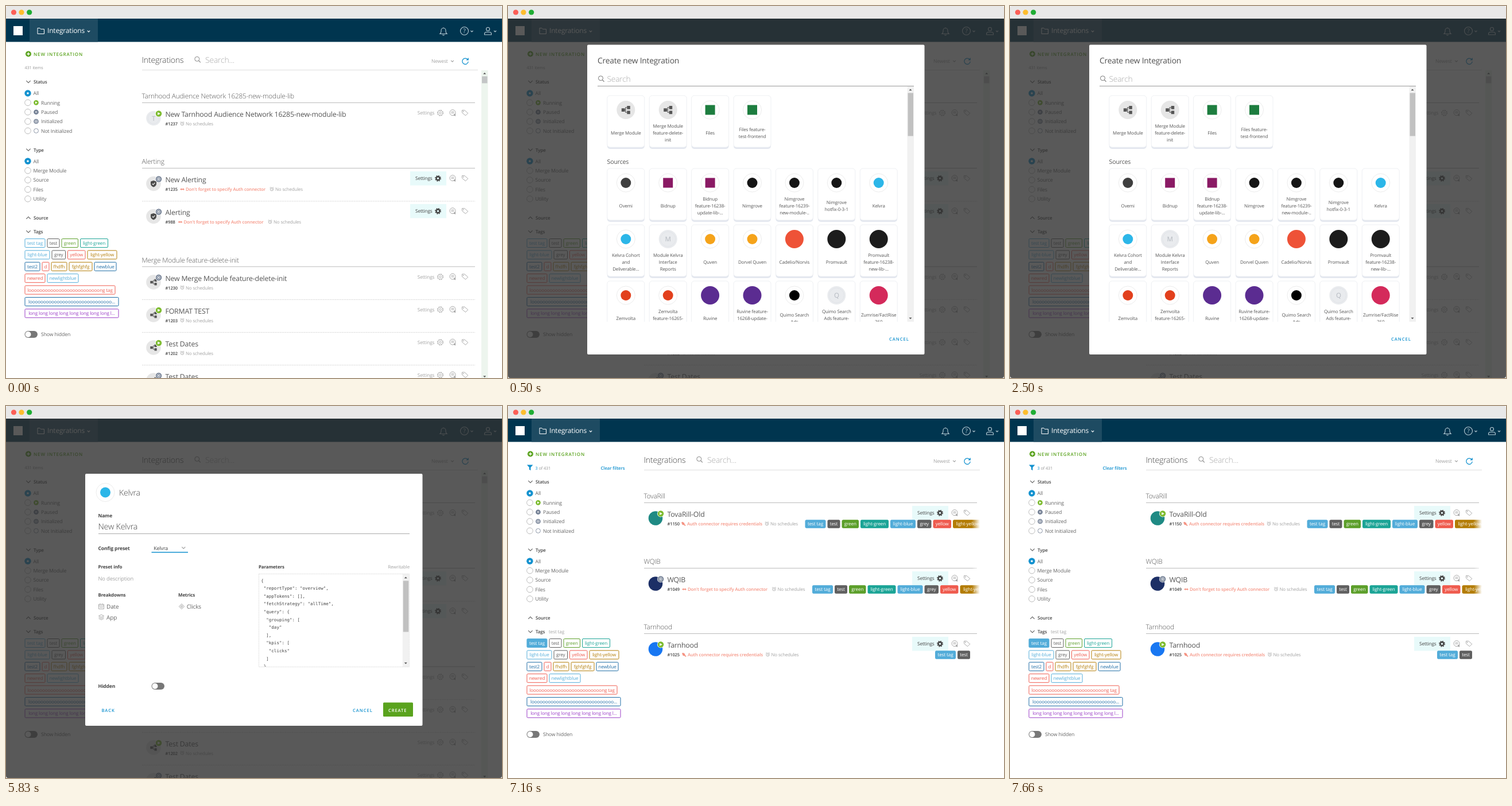
An HTML page for the animation above (8000 ms loop, 864 px wide and 648 px high).

```html
<!DOCTYPE html>
<html lang="en">
<head>
<meta charset="utf-8">
<title>Integrations</title>
<style>
html, body { margin: 0; width: 100%; height: 100%; overflow: hidden; background: #fff; }
svg { display: block; width: 864px; height: 648px; }
text { font-family: "Open Sans", "Noto Sans", sans-serif; letter-spacing: -.015em; white-space: pre; text-rendering: geometricPrecision; }
.mono { font-family: "DejaVu Sans Mono", "Liberation Mono", monospace; letter-spacing: 0; }
</style>
</head>
<body>
<svg id="stage" viewBox="0 0 864 648" xmlns="http://www.w3.org/2000/svg"></svg>
<script>
const LOOP = 8000;
const BLUE = '#1492cf', GREEN = '#5aa31e', LIME = '#7cbb2e', CORAL = '#f59484', SLATE = '#6f7c91', GREY = '#a3a3a3';

// Drawing helpers
const text = (x, y, s, size, fill = '#555', weight = 400, extra = '') =>
  `<text x="${x}" y="${y}" font-size="${size}" fill="${fill}" font-weight="${weight}" ${extra}>${s}</text>`;
const rect = (x, y, w, h, fill, extra = '') =>
  `<rect x="${x}" y="${y}" width="${w}" height="${h}" fill="${fill}" ${extra}/>`;
const circle = (x, y, r, fill, extra = '') =>
  `<circle cx="${x}" cy="${y}" r="${r}" fill="${fill}" ${extra}/>`;
const ring = (x, y, r, stroke, w = 1, extra = '') =>
  circle(x, y, r, 'none', `stroke="${stroke}" stroke-width="${w}" ${extra}`);
const line = (d, stroke, w = 1, extra = '') =>
  `<path d="${d}" fill="none" stroke="${stroke}" stroke-width="${w}" ${extra}/>`;
const shape = (d, fill) => `<path d="${d}" fill="${fill}"/>`;
const at = (x, y, body) => `<g transform="translate(${x} ${y})">${body}</g>`;
const caps = (x, y, s, size, fill, gap = 1) => text(x, y, s, size, fill, 600, `style="letter-spacing:${gap}px"`);
const chevron = (x, y, r, color, up = false) => {
  const h = up ? -r / 2 : r / 2;
  return line(`M${x - r} ${y - h}L${x} ${y + h}L${x + r} ${y - h}`, color, 1.1);
};

// Icons
const lens = (x, y, r, color) => ring(x, y, r, color) + line(`M${x + r * .7} ${y + r * .7}l3.2 3.2`, color, 1.2);
const toggle = (x, y) => rect(x, y - 6, 22.5, 12, '#777', 'rx="6"') + circle(x + 6, y, 5, '#fff');
const gear = (x, y, hot) => hot
  ? ring(x, y, 3, '#444', 2.4) + ring(x, y, 4.7, '#444', 1.4, 'stroke-dasharray="2 1.69"')
  : ring(x, y, 4.3, GREY, .8) + ring(x, y, 5, GREY, 1, 'stroke-dasharray="2 1.93"') + ring(x, y, 1.8, GREY, .8);
const chat = (x, y) => ring(x, y - .3, 5, GREY, .9) +
  line('M-2.6 -1.8h5.2M-2.6 .4h5.2', GREY, .9, `transform="translate(${x} ${y})"`) + shape(`M${x + 1} ${y + 4}l4 2v-5z`, GREY);
const label = (x, y) => at(x, y, line('M-5 -4.5h4.2l6 5.2-4.2 4.2-6-5z', GREY, .9, 'stroke-linejoin="round"') + circle(-2.6, -2.2, .9, GREY));
const clock = (x, y) => ring(x, y, 2.7, GREY, .8) + line(`M${x} ${y - 1.6}v1.8h1.4M${x - 3.4} ${y - 2.5}l1.6-1.4M${x + 3.4} ${y - 2.5}l-1.6-1.4`, GREY, .7);
const play = (x, y, r) => circle(x, y, r, LIME) + shape(`M${x - r * .35} ${y - r * .5}v${r}l${r * .9}-${r * .5}z`, '#fff');
const ready = (x, y, r) => circle(x, y, r, SLATE) + ring(x, y, r * .58, '#fff', .8) + circle(x, y, r * .25, '#fff');
const paused = (x, y, r) => circle(x, y, r, SLATE) + line(`M${x - 1} ${y - 1.8}v3.6M${x + 1} ${y - 1.8}v3.6`, '#fff', .9);
const merge = (x, y, k = 1) => `<g transform="translate(${x} ${y}) scale(${k})">` +
  rect(-6, -2.2, 4.6, 4.6, '#555') + rect(1.6, -5.6, 4.4, 4.6, '#555') + rect(1.6, 1.2, 4.4, 4.6, '#555') +
  line('M-2 0h2M2 -3.4h-2.4v6.8h2.4', '#555', .9) + '</g>';
const shield = (x, y) => at(x, y, shape('M0-5.6L5-3.7V0Q5 4 0 6Q-5 4-5 0V-3.7z', '#4c4c4c') + line('M-2.3 0L-.6 1.8L2.5-1.6', '#fff', 1.1));
const letter = (x, y, s, r) => circle(x, y, r, '#e9ebee') + ring(x, y, r - 3, '#dcdfe4', .6) +
  text(x, y + 4, s, 11.5, '#b4b9c0', 400, 'text-anchor="middle"');
const plug = (x, y) => shape(`M${x} ${y}l3-2v1.3h2v-1.3l3 2-3 2v-1.3h-2v1.3z`, CORAL);
const wrench = (x, y) => shape(`M${x} ${y - 2.5}l2-1 3.2 2 .3 2 2.2 2.2-1 1-2.5-1.6-2.4-.4z`, CORAL);

// Tags: width, name, colour
const SKY = '#52acd9', RED = '#ef5b4e', OCHRE = '#b37c05', NAVY = '#1f6da6';
const TAGS = [
  [[35, 'test tag', SKY], [21, 'test', '#606060'], [28.5, 'green', '#5c9f2a'], [48, 'light-green', '#1ba496']],
  [[43, 'light-blue', SKY], [23.5, 'grey', '#606060'], [30.5, 'yellow', RED], [51, 'light-yellow', OCHRE]],
  [[26, 'test2', NAVY], [12, 'd', RED], [27, 'fhdfh', OCHRE], [40, 'fghfghfg', OCHRE], [38, 'newblue', NAVY]],
  [[35, 'newred', RED], [54, 'newlightblue', SKY]],
  [[157, 'l' + 'o'.repeat(26) + 'ng tag', RED]],
  [[163, 'l' + 'o'.repeat(30) + '...', NAVY]],
  [[163, 'long '.repeat(8) + 'l...', '#9a3cc6']]
];

function tagBox(x, y, [w, name, color], solid, h = 15) {
  return rect(x, y - h / 2, w, h, solid ? color : '#fff', `rx="1.5" stroke="${color}"`) +
    text(x + w / 2, y + 2.9, name, 8.1, solid ? '#fff' : color, 400, 'text-anchor="middle"');
}

function tagRow(x, y, tags, solid, h) {
  return tags.map(tag => {
    const box = tagBox(x, y, tag, solid(tag), h);
    x += tag[0] + 4;
    return box;
  }).join('');
}

function radio(x, y, on) {
  return on ? circle(x, y, 5.7, BLUE) + circle(x, y, 1.7, '#fff') : ring(x, y, 5.3, '#b5b5b5', .9);
}

function sidebar(filtered) {
  const head = (y, s, up) => chevron(39, y, 3.6, '#555', up) + text(48, y + 3, s, 8, '#444', 600);
  const icons = [null, play, paused, ready, (x, y, r) => ring(x, y, r - .4, SLATE, .8)];
  let out = circle(39, 83.5, 5, GREEN) + line('M36.3 83.5h5.4M39 80.8v5.4', '#fff', 1.4) +
    caps(48, 87, 'NEW INTEGRATION', 8, GREEN, .85);
  out += filtered
    ? shape('M33 102.5h10.5l-4 4.6v5.2l-2.5-1.6v-3.6z', BLUE) + text(47.5, 111, `<tspan fill="${BLUE}">3</tspan> of 431`, 7.4, '#999') +
      text(161.5, 111, 'Clear filters', 7.8, BLUE, 600) + text(71, 396, 'test tag', 8.1, GREY)
    : text(32.5, 110, '431 items', 7.25, '#999');
  out += head(132, 'Status');
  ['All', 'Running', 'Paused', 'Initialized', 'Not Initialized'].forEach((s, i) => {
    const y = 152 + 16.35 * i;
    out += radio(38, y, !i) + (i ? icons[i](52.5, y, 4.3) : '') + text(i ? 61 : 47.5, y + 3.2, s, 8.75, '#666');
  });
  out += head(250.5, 'Type');
  ['All', 'Merge Module', 'Source', 'Files', 'Utility'].forEach((s, i) => {
    const y = 270.3 + 16.4 * i;
    out += radio(38, y, !i) + text(47.5, y + 3.2, s, 8.75, '#666');
  });
  out += head(369, 'Source', true) + head(393, 'Tags');
  TAGS.forEach((row, i) => {
    out += tagRow(33, 413 + 20.4 * i, row, tag => filtered && tag[1] === 'test tag');
  });
  return out + toggle(32.5, 572) + text(61, 575.2, 'Show hidden', 8.7, '#666');
}

function chrome() {
  const pale = '#b9cbd4';
  return rect(0, 0, 864, 22, '#e8e8e8') +
    circle(13.5, 11, 4.6, '#fb5f57') + circle(27, 11, 4.6, '#fdbd2e') + circle(40.7, 11, 4.6, '#1fad34') +
    rect(0, 22, 864, 40.5, '#00354f') + rect(41, 22, 119, 40.5, '#1e4b62') + rect(13, 35, 16, 16, '#fff') +
    line('M55 48.5v-10h4l1.5 1.8h6v8.2z', '#fff', 1, 'stroke-linejoin="round"') +
    text(72, 47.2, 'Integrations', 12, '#fff') + chevron(144, 44, 2.2, '#fff') +
    line('M756 48.5q2-1.5 2-4.5v-1.5a4 4 0 0 1 8 0v1.5q0 3 2 4.5zM760.5 50a1.6 1.6 0 0 0 3 0M762 38.5v-1', pale, 1.1) +
    ring(798.5, 43.5, 7, pale, 1.1) + text(798.5, 47.3, '?', 10.5, pale, 400, 'text-anchor="middle"') + chevron(811.5, 44, 2, pale) +
    ring(839.5, 40.2, 3, pale, 1.1) + line('M833.5 50v-1.5q0-3 3-3h6q3 0 3 3v1.5z', pale, 1.1) + chevron(852, 44, 2, pale);
}

function listHead() {
  return text(236.5, 99, 'Integrations', 14.1, '#444', 300) + lens(332.8, 92.3, 4, '#888') + text(347, 99, 'Search...', 14, '#aaa', 300) +
    text(741, 99, 'Newest', 8.5, GREY) + chevron(777.5, 96, 2.4, GREY) +
    line('M804.2 93.2a5.2 5.2 0 1 0 1 3.6', BLUE, 1.3) + shape('M805.8 90v4.4h-4.4z', BLUE) +
    line('M237 111.5H822', '#dedede');
}

const section = (y, s) => text(236.5, y + 4.2, s, 11.8, '#555', 300) + line(`M237 ${y + 11.5}H817`, '#bbb');

function row({ y, name, id, avatar, badge, warn, warnX = 313, mark = plug, clockX = 307, hot, tagX, tags = [] }) {
  let out = avatar(257, y + 6.5) + circle(266, y - 1.5, 6, '#fff') + badge(266, y - 1.5, 5.2) +
    text(277.5, y + 4.3, name, 12.3, '#555') + text(277.5, y + 19, '#' + id, 7.5, '#444', 600);
  if (warn) out += mark(warnX - 10, y + 16.2) + text(warnX, y + 19, warn, 7.8, CORAL, 600);
  out += clock(clockX, y + 16.2) + text(clockX + 6, y + 19, 'No schedules', 7.9, GREY);
  if (hot) out += rect(704, y - 15, 63, 24.5, '#e8fafa');
  out += text(hot ? 713 : 716.8, y + .4, 'Settings', 8.25, hot ? '#444' : GREY) + gear(hot ? 752.5 : 756.5, y - 2.7, hot) +
    chat(778, y - 3) + label(799.5, y - 3);
  return out + tagRow(tagX, y + 16.5, tags, () => true, 13.5);
}

const disc = color => (x, y) => circle(x, y, 12.3, color);
const grey = icon => (x, y) => circle(x, y, 12.8, '#e6e6e6') + icon(x, y);
const FORGET = "Don't forget to specify Auth connector", REQUIRES = 'Auth connector requires credentials';
const arrow = (x, y, up) => shape(`M${x - 2.5} ${y + (up ? 1.3 : -1.3)}h5l-2.5 ${up ? -2.8 : 2.8}z`, '#555');

function fullList() {
  const net = grey((x, y) => merge(x, y, .95)), alert = grey(shield);
  const rows = [
    { y: 189, name: 'New Tarnhood Audience Network 16285-new-module-lib', id: 1237, avatar: (x, y) => letter(x, y, 'T', 12.8), badge: play },
    { y: 303, name: 'New Alerting', id: 1235, avatar: alert, badge: ready, warn: FORGET, clockX: 463, hot: true },
    { y: 360, name: 'Alerting', id: 988, avatar: alert, badge: ready, warn: FORGET, warnX: 309.5, clockX: 460, hot: true },
    { y: 474.5, name: 'New Merge Module feature-delete-init', id: 1230, avatar: net, badge: ready },
    { y: 531.5, name: 'FORMAT TEST', id: 1203, avatar: net, badge: play },
    { y: 588.5, name: 'Test Dates', id: 1202, avatar: net, badge: play },
    { y: 645.5, name: 'Test Dates', id: 1201, avatar: net, badge: ready }
  ];
  return section(157, 'Tarnhood Audience Network 16285-new-module-lib') + section(271, 'Alerting') +
    section(442.5, 'Merge Module feature-delete-init') + rows.map(row).join('') +
    [340, 511.5, 568.5, 625.5].map(y => line(`M237 ${y}H817`, '#d8d8d8', 1, 'stroke-dasharray="2 1"')).join('') +
    rect(828, 112, 11.5, 536, '#edf5ee') + rect(829, 122.5, 9.5, 12, '#c3c5c6') + arrow(833.7, 117.5, true) + arrow(833.7, 645.5);
}

function filteredList() {
  const tags = [...TAGS[0], ...TAGS[1]];
  const rows = [
    { y: 189, name: 'TovaRill-Old', id: 1150, avatar: disc('#1f8a84'), badge: play, warn: REQUIRES, warnX: 312, mark: wrench, clockX: 451, tagX: 518, tags },
    { y: 303, name: 'WQIB', id: 1049, avatar: disc('#1c2f66'), badge: ready, warn: FORGET, clockX: 463.5, tagX: 530.5, tags },
    { y: 417, name: 'Tarnhood', id: 1025, avatar: disc('#1877f2'), badge: play, warn: REQUIRES, mark: wrench, clockX: 452.5, tagX: 744.5, tags: tags.slice(0, 2) }
  ];
  return section(157, 'TovaRill') + section(271, 'WQIB') + section(385, 'Tarnhood') +
    `<g clip-path="url(#list)">${rows.map(r => row({ ...r, hot: true })).join('')}${rect(808, 196, 14, 134, 'url(#fade)')}</g>`;
}

// Modal cards: picture, then label lines
const ringed = (x, y) => circle(x, y, 16, '#fff', 'stroke="#ececec"');
const dot = color => (x, y) => ringed(x, y) + circle(x, y, 9, color);
const square = color => (x, y) => ringed(x, y) + rect(x - 8.5, y - 8.5, 17, 17, color);
const big = color => (x, y) => circle(x, y, 16, color);
const module = (x, y) => circle(x, y, 16, '#e6e6e6') + merge(x, y, 1.25);
const holder = s => (x, y) => letter(x, y, s, 16);
const sheet = square('#1d7d3f'), bars = square('#8a1a64'), rocket = dot('#151515'), cyan = dot('#2cb6e8');
const CARDS = [
  [156, [[module, 'Merge Module'], [module, 'Merge Module|feature-delete-|init'], [sheet, 'Files'], [sheet, 'Files feature-|test-frontend']]],
  [283, [[dot('#3f3f3f'), 'Ovemi'], [bars, 'Bidnup'], [bars, 'Bidnup|feature-16238-|update-lib-...'], [rocket, 'Nimgrove'],
    [rocket, 'Nimgrove|feature-16239-|new-module-..'], [rocket, 'Nimgrove|hotfix-0-3-1'], [cyan, 'Kelvra']]],
  [381, [[cyan, 'Kelvra Cohort|and|Deliverable...'], [holder('M'), 'Module Kelvra|Interface|Reports'], [dot('#f5a31a'), 'Quven'],
    [dot('#f5a31a'), 'Dorvel Quven'], [big('#ee5237'), 'Cadelio/Norvis'], [big('#1c1c1c'), 'Promvault'], [big('#1c1c1c'), 'Promvault|feature-16238-|new-lib-...']]],
  [479, [[dot('#e2401d'), 'Zemvolta'], [dot('#e2401d'), 'Zemvolta|feature-16265-|update-lib-...'], [big('#5b2c91'), 'Ruvine'],
    [big('#5b2c91'), 'Ruvine feature-|16268-update-|lib-...'].slice(0, 2), [dot('#000'), 'Quimo Search|Ads'], [holder('Q'), 'Quimo Search|Ads feature-|16270-...'], [big('#d42a5b'), 'Zumrise/FactRise|360']]]
];

function card(x, y, [icon, name]) {
  const lines = name.split('|');
  return rect(x, y + 1.5, 65, 91.5, '#e3e7ef', 'rx="5"') + rect(x, y, 65, 90, '#fff', 'rx="5" stroke="#eef0f3"') + icon(x + 32.5, y + 25) +
    lines.map((s, i) => text(x + 32.5, y + 68.4 - 6 * (lines.length - 1) + 12 * i, s, 7.95, '#555', 400, 'text-anchor="middle"')).join('');
}

const panel = (y, h) => rect(138, y, 587.5, h, '#fff', 'rx="2"');

function scrollbar(x, top, bottom, from, to) {
  return rect(x, top, 11.5, bottom - top, '#f1f1f1') + rect(x + 1, from, 9.5, to - from, '#c1c1c1') +
    arrow(x + 5.5, top + 6, true) + arrow(x + 5.5, bottom - 6);
}

function picker() {
  const cards = CARDS.map(([y, items]) => items.map((c, i) => card(172.8 + 73.4 * i, y, c)).join('')).join('');
  return panel(67.5, 539.5) + text(156, 99.8, 'Create new Integration', 13.8, '#505050') +
    lens(161.5, 125.8, 4, '#777') + text(172.5, 132, 'Search', 13.8, '#aaa', 300) +
    `<g clip-path="url(#cards)">${cards}${text(172.5, 274.5, 'Sources', 10.6, '#555')}</g>` +
    line('M156 139.5H707', '#999') + scrollbar(695.5, 140, 550, 151.5, 226.5) + caps(664, 582.5, 'CANCEL', 7.6, BLUE);
}

const CODE = `{
 "reportType": "overview",
 "appTokens": [],
 "fetchStrategy": "allTime",
 "query": {
  "grouping": [
   "day"
  ],
  "kpis": [
   "clicks"
  ]
 }`;

function editor() {
  const bold = (x, y, s, size = 8) => text(x, y, s, size, '#444', 700);
  const soft = '#999';
  return panel(118, 439) + ringed(173, 150.5) + circle(173, 150.5, 9, '#2cb6e8') + text(197, 156, 'Kelvra', 14, '#444', 300) +
    bold(160.5, 194, 'Name', 8.4) + text(160.5, 215, 'New Kelvra', 14.3, '#444', 300) + line('M161 222.5H703', '#aaa') +
    bold(160.5, 250.5, 'Config preset', 8.6) + text(257.3, 250.5, 'Kelvra', 8.9, '#444') +
    chevron(309.3, 247, 3, GREY) + line('M253.5 254.7H317', BLUE, 1.5) +
    bold(160.5, 283.3, 'Preset info') + text(160.5, 303.6, 'No description', 9.3, GREY) +
    bold(160.5, 332, 'Breakdowns') + bold(300, 332, 'Metrics') +
    line('M161.5 345.5h9v8h-9zM161.5 348h9M164 344v2M168 344v2M163 350.7h6', soft, .8) + text(175, 353, 'Date', 10, '#666') +
    line('M166 363.5l4.5 2.2-4.5 2.2-4.5-2.2zM161.5 368l4.5 2.2 4.5-2.2M161.5 370.2l4.5 2.2 4.5-2.2', soft, .8) + text(175, 371.5, 'App', 10, '#666') +
    line('M306 344.7l4.5 4.5-4.5 4.5-4.5-4.5z', soft, .9) + ring(306, 349.2, 1.5, soft, .9) + text(314.7, 353, 'Clicks', 10, '#666') +
    bold(440, 283.3, 'Parameters', 7.9) + text(703, 283.3, 'Rewritable', 7.9, GREY, 400, 'text-anchor="end"') +
    rect(440.5, 292.5, 262, 162, '#fff', 'stroke="#ddd" stroke-dasharray="2 1"') +
    `<g clip-path="url(#code)">${CODE.split('\n').map((s, i) => text(444.3, 306.5 + 13.6 * i, s, 7.5, '#444', 400, 'class="mono"')).join('')}</g>` +
    scrollbar(690.8, 293, 454, 304.5, 393.5) +
    bold(160.5, 491, 'Hidden', 8.5) + toggle(253.5, 488) + caps(166.5, 532.6, 'BACK', 7.6, BLUE) + caps(604, 532.6, 'CANCEL', 7.6, BLUE) +
    rect(657, 516.5, 52, 24.5, GREEN, 'rx="1.5"') + caps(666, 532.6, 'CREATE', 7.6, '#fff', .9);
}

const clip = (id, x, y, w, h) => `<clipPath id="${id}">${rect(x, y, w, h, '#000')}</clipPath>`;
const layer = (id, body) => `<g id="${id}">${body}</g>`;
const stage = document.getElementById('stage');
stage.innerHTML = '<defs>' + clip('cards', 156, 140, 540, 410) + clip('code', 441, 293, 249, 161) + clip('list', 230, 100, 592, 548) +
  '<clipPath id="window"><rect width="864" height="648" rx="4"/></clipPath>' +
  '<linearGradient id="fade"><stop stop-color="#fff" stop-opacity="0"/><stop offset="1" stop-color="#fff"/></linearGradient></defs>' +
  '<g clip-path="url(#window)">' + chrome() + listHead() +
  layer('full', sidebar(false) + fullList()) + layer('filtered', sidebar(true) + filteredList()) +
  layer('dim', rect(0, 22, 864, 626, 'rgba(48,48,48,.8)')) + layer('picker', picker()) + layer('editor', editor()) + '</g>';

// Start time of each step and the layers it shows
const STEPS = [
  [0, ['full']],
  [500, ['full', 'dim', 'picker']],
  [3830, ['full', 'dim', 'editor']],
  [7160, ['filtered']]
];
const layers = [...stage.querySelectorAll('g[id]')];

function update(time) {
  const [, shown] = STEPS.filter(([from]) => from <= time).pop();
  for (const g of layers) g.setAttribute('display', shown.includes(g.id) ? 'inline' : 'none');
}

const start = performance.now();
function tick() {
  update((performance.now() - start) % LOOP);
  requestAnimationFrame(tick);
}
tick();
</script>
</body>
</html>
```
